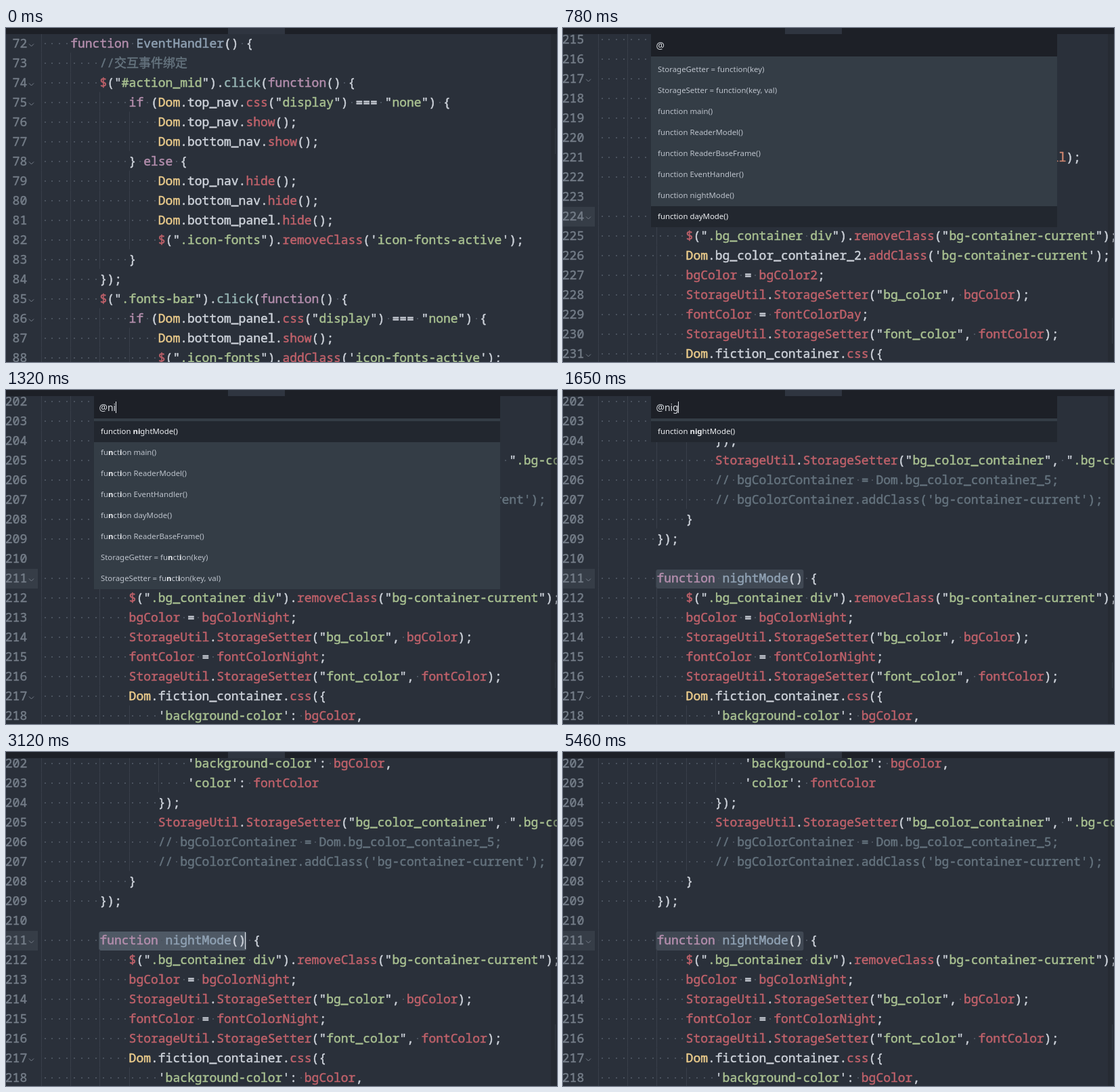
Recreate the animation shown at these times as an HTML page with a canvas. Size 814 by 493 pixels, loop 5500 ms.

```html
<!DOCTYPE html>
<html lang="en">
<head>
<meta charset="utf-8">
<title>Go to symbol</title>
<style>
html, body { margin: 0; width: 100%; height: 100%; overflow: hidden; background: #2a303a; }
canvas { display: block; }
</style>
</head>
<body>
<canvas id="stage" width="814" height="493"></canvas>
<script>
const ctx = document.getElementById('stage').getContext('2d');

const LOOP = 5500, W = 814, H = 493;
const LEFT = 52, COL = 10.8, ROW = 29;
const MONO = '500 18px "Noto Sans Mono", "Noto Sans CJK SC", monospace';
const UI = '"Noto Sans", sans-serif';

const C = {
  bg: '#2a303a', bar: '#1d2027', tab: '#2f3540', fg: '#cdd2da', number: '#747d88',
  dot: '#4a525e', guide: '#393f4a', active: '#363d47', idle: '#404853', focus: '#4f5965',
  list: '#343d46', row: '#22272f', item: '#bcc2cb',
  red: '#bf616a', green: '#a9c191', blue: '#8fa1b3', purple: '#b48ead',
  yellow: '#ebcb8b', cyan: '#96b5b4', orange: '#d08770', comment: '#65737e'
};

const lines = new Map();
const addLines = (first, text) =>
  text.slice(1).split('\n').forEach((s, i) => lines.set(first + i, s));

addLines(72, `
    function EventHandler() {
        //交互事件绑定
        $("#action_mid").click(function() {
            if (Dom.top_nav.css("display") === "none") {
                Dom.top_nav.show();
                Dom.bottom_nav.show();
            } else {
                Dom.top_nav.hide();
                Dom.bottom_nav.hide();
                Dom.bottom_panel.hide();
                $(".icon-fonts").removeClass('icon-fonts-active');
            }
        });
        $(".fonts-bar").click(function() {
            if (Dom.bottom_panel.css("display") === "none") {
                Dom.bottom_panel.show();
                $(".icon-fonts").addClass('icon-fonts-active');`);

addLines(202, `
                    'background-color': bgColor,
                    'color': fontColor
                });
                StorageUtil.StorageSetter("bg_color_container", ".bg-container-5");
                // bgColorContainer = Dom.bg_color_container_5;
                // bgColorContainer.addClass('bg-container-current');
            }
        });

        function nightMode() {
            $(".bg_container div").removeClass("bg-container-current");
            bgColor = bgColorNight;
            StorageUtil.StorageSetter("bg_color", bgColor);
            fontColor = fontColorNight;
            StorageUtil.StorageSetter("font_color", fontColor);
            Dom.fiction_container.css({
                'background-color': bgColor,
                'color': fontColor
            });
            StorageUtil.StorageSetter("bg_color_container", null);
        }

        function dayMode() {
            $(".bg_container div").removeClass("bg-container-current");
            Dom.bg_color_container_2.addClass('bg-container-current');
            bgColor = bgColor2;
            StorageUtil.StorageSetter("bg_color", bgColor);
            fontColor = fontColorDay;
            StorageUtil.StorageSetter("font_color", fontColor);
            Dom.fiction_container.css({`);

const rules = [
  [/^\/\//, C.comment],
  [/^(function|if|else)$/, C.purple],
  [/^Dom$/, C.yellow],
  [/^(EventHandler|nightMode|dayMode)$/, C.blue],
  [/^click$/, C.cyan],
  [/^null$/, C.orange],
  [/^(\$|css|show|hide|addClass|removeClass|Storage\w+|bgColor\w*|fontColor\w*)$/, C.red]
];
const colorOf = word => (rules.find(([re]) => re.test(word)) || [0, C.fg])[1];

const fn = name => `function ${name}()`;
const storage = ['StorageGetter = function(key)', 'StorageSetter = function(key, val)'];
const byPlace = [...storage,
  ...['main', 'ReaderModel', 'ReaderBaseFrame', 'EventHandler', 'nightMode', 'dayMode'].map(fn)];
const byMatch = [
  ...['nightMode', 'main', 'ReaderModel', 'EventHandler', 'dayMode', 'ReaderBaseFrame'].map(fn),
  ...storage];

// start, top line, its middle y, query, caret, active line, editor focus
const steps = [
  [0, 72, 22, null, 0, 0, 0],
  [300, 72, 18, '', 1, 0, 0],
  [450, 215, 16, '', 1, 224, 0],
  [780, 215, 16, '', 0, 224, 0],
  [1170, 213, 14.5, 'n', 1, 211, 0],
  [1230, 205, 10, 'n', 1, 211, 0],
  [1320, 202, 16, 'ni', 1, 211, 0],
  [1650, 202, 16, 'nig', 1, 211, 0],
  [2160, 202, 16, 'nig', 0, 211, 0],
  [2700, 202, 16, 'nig', 1, 211, 0],
  [3120, 202, 16, null, 1, 211, 1],
  [3600, 202, 16, null, 0, 211, 1],
  [4080, 202, 16, null, 1, 211, 1],
  [4620, 202, 16, null, 0, 211, 1],
  [5090, 202, 16, null, 1, 211, 1],
  [5460, 202, 16, null, 0, 211, 0]
];

const colX = col => LEFT + col * COL;
const baseline = y => Math.round(y + 6.6);

function box(x, y, w, h, color) {
  ctx.fillStyle = color;
  ctx.fillRect(x, y, w, h);
}

function write(s, x, y, color) {
  ctx.fillStyle = color;
  ctx.fillText(s, x, y);
}

// Editor text is a little heavier than the plain face
function writeCode(s, x, y, color) {
  write(s, x, y, color);
  ctx.strokeStyle = color;
  ctx.lineWidth = 0.5;
  ctx.strokeText(s, x, y);
}

function drawCode(text, y) {
  const base = baseline(y);
  const indent = text ? text.search(/\S/) : 8;
  for (let c = 0; c < indent; c += 4) box(Math.round(colX(c)), y - 14.5, 1, ROW, C.guide);
  [...text].forEach((ch, c) => {
    if (ch === ' ') box(Math.round(colX(c) + 4.5), base - 7, 2, 2, C.dot);
  });
  for (const m of text.matchAll(/\/\/.*|(["'])(.*?)\1|\w+|[^\s\w]+?/g)) {
    const [word, quote, body] = m;
    if (quote) {
      writeCode(quote, colX(m.index), base, C.fg);
      writeCode(body, colX(m.index + 1), base, C.green);
      writeCode(quote, colX(m.index + word.length - 1), base, C.fg);
    } else {
      writeCode(word, colX(m.index), base, colorOf(word));
    }
  }
}

function drawGutter(n, text, y) {
  ctx.textAlign = 'right';
  writeCode(n, 31.2, baseline(y), C.number);
  ctx.textAlign = 'left';
  if (!text.endsWith('{')) return;
  ctx.lineWidth = 1;
  ctx.beginPath();
  ctx.moveTo(34, y + 1.5);
  ctx.lineTo(37.5, y + 5);
  ctx.lineTo(41, y + 1.5);
  ctx.stroke();
}

function drawSelection(text, y, focus, caret) {
  const x = colX(8), end = colX(text.indexOf(')') + 1);
  box(0, y - 13, 47, ROW, C.active);
  ctx.fillStyle = focus ? C.focus : C.idle;
  ctx.beginPath();
  ctx.roundRect(x - 1, y - 12, end - x + 2, 28, 3);
  ctx.fill();
  if (focus && caret) box(353, y - 11, 1, 25, '#e4e7ec');
}

function drawEditor(top, topY, active, focus, caret) {
  ctx.font = MONO;
  ctx.lineJoin = 'round';
  for (let n = top - 1, y = topY - ROW; y < H + 15; n++, y += ROW) {
    const text = lines.get(n);
    if (text === undefined) continue;
    if (n === active) drawSelection(text, y, focus, caret);
    drawCode(text, y);
    drawGutter(n, text, y);
  }
  box(805, 9, 9, H - 9, 'rgba(29,32,39,.32)');
  box(811, Math.round(9 + (top - 1) * 1.957), 1, 38, '#323943');
}

// Letters to embolden: a word that starts with the query, else the first letters in order
function matches(name, query) {
  const at = name.indexOf(' ' + query) + 1;
  if (at) return [...query].map((_, i) => at + i);
  let from = -1;
  return [...query].map(ch => (from = name.indexOf(ch, from + 1)));
}

function drawItem(name, i, query, selected) {
  const y = 46 + i * 31;
  if (selected) box(130, y, 600, 31, C.row);
  const bold = query ? matches(name, query) : [];
  let x = 140, run = '';
  [...name].forEach((ch, k) => {
    run += ch;
    const strong = bold.includes(k);
    if (k + 1 < name.length && strong === bold.includes(k + 1)) return;
    ctx.font = `${strong ? 700 : 400} 11.4px ${UI}`;
    write(run, x, y + 19, strong || selected ? '#eef0f3' : C.item);
    x += ctx.measureText(run).width;
    run = '';
  });
}

function drawPopup(query, caret) {
  const names = !query ? byPlace : query === 'nig' ? byMatch.slice(0, 1) : byMatch;
  const picked = query ? 0 : names.length - 1;
  box(130, 9, 600, 33, C.bar);
  box(130, 42, 600, 4 + names.length * 31, C.list);
  names.forEach((name, i) => drawItem(name, i, query, i === picked));
  ctx.font = `13.87px ${UI}`;
  write('@' + query, 137.5, 31, '#d8dbe0');
  if (caret) box(Math.floor(137.5 + ctx.measureText('@' + query).width), 17, 1, 17, '#e4e7ec');
}

function draw(time) {
  const [, top, topY, query, caret, active, focus] = steps.findLast(s => s[0] <= time);
  box(0, 0, W, H, C.bg);
  drawEditor(top, topY, active, focus, caret);
  box(0, 0, W, 9, C.bar);
  box(328, 0, 84, 9, C.tab);
  if (query !== null) drawPopup(query, caret);
}

const start = performance.now();
function tick() {
  draw((performance.now() - start) % LOOP);
  requestAnimationFrame(tick);
}
tick();
</script>
</body>
</html>
```
